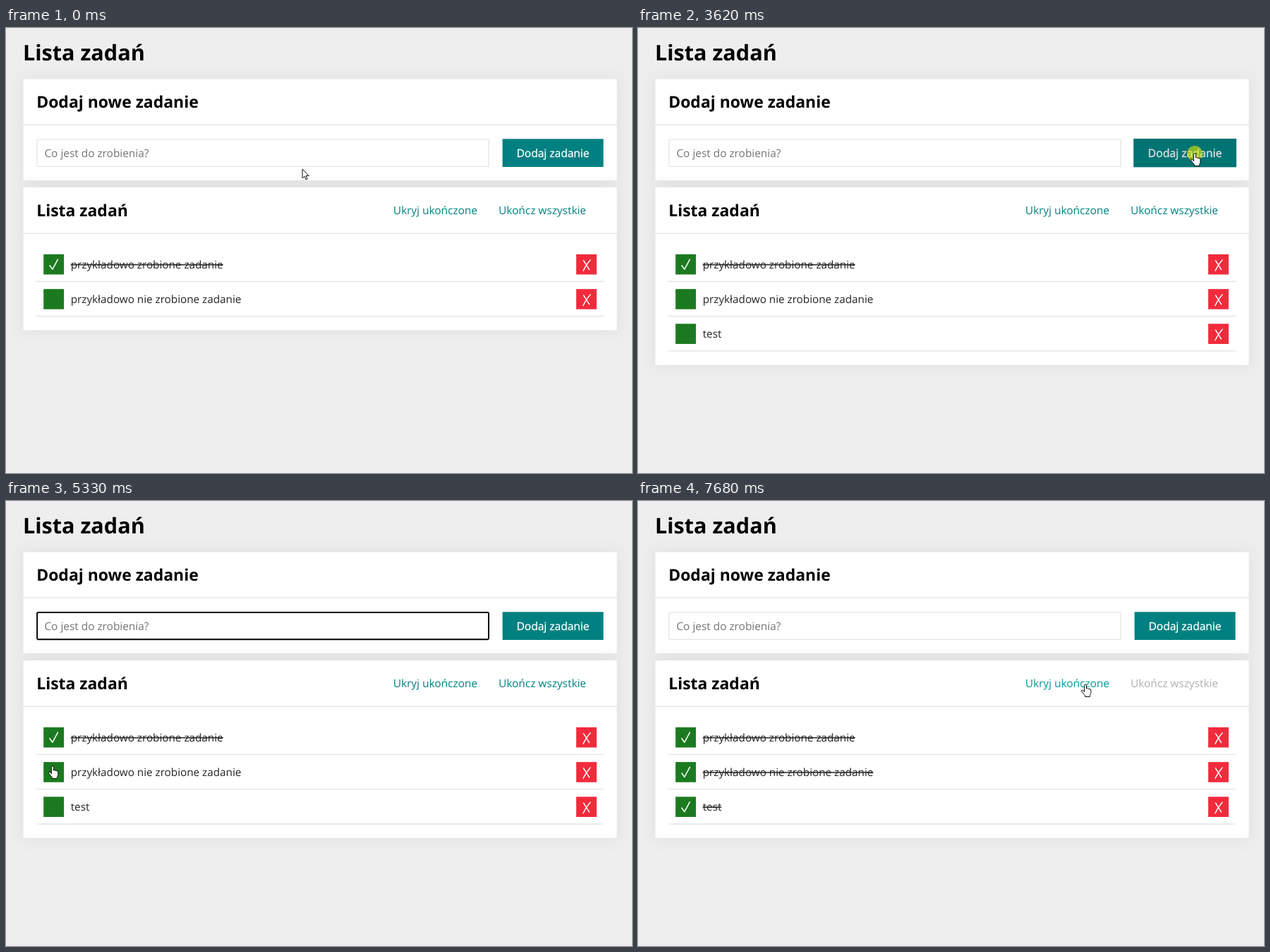
Write an HTML page that moves like this. It is 887x631 px and loops after 8 s.

```html
<!DOCTYPE html>
<html lang="pl">
<head>
<meta charset="utf-8">
<title>Lista zadań</title>
<style>
  html, body { margin: 0; width: 100%; height: 100%; overflow: hidden; background: #eee; }
  svg { display: block; width: 100vw; height: 100vh; }
  text { font: 15.4px "Open Sans", "Noto Sans", sans-serif; text-rendering: geometricPrecision; white-space: pre; }
  .title { font-size: 30.6px; font-weight: 700; }
  .heading { font-size: 22.95px; font-weight: 700; }
  .item { font-size: 15.26px; fill: #242424; }
  .done { text-decoration: line-through; }
  .card { fill: #fff; filter: drop-shadow(0 0 10px #ddd); }
  .rule { stroke: #e6e6e6; stroke-width: 1.4; }
  .mark { fill: none; stroke: #fff; stroke-width: 1.5; stroke-linecap: round; stroke-linejoin: round; }
  .field { fill: #fff; stroke: #e8e8e8; stroke-width: 1.4; }
  .field.focused { stroke: #000; stroke-width: 1.9; rx: 1.5px; }
  #buttonText { font-size: 15.5px; stroke-width: .3; text-anchor: middle; }
</style>
</head>
<body>
<svg viewBox="0 0 887 631">
  <rect width="887" height="631" fill="#eee"/>
  <text class="title" x="23.9" y="46">Lista zadań</text>

  <rect class="card" x="24.5" y="72.5" width="841" height="143.5"/>
  <rect class="card" id="listCard" x="24.5" y="226" width="841"/>
  <path class="rule" d="M24.5 137.3H865.5M24.5 291.2H865.5"/>
  <text class="heading" x="43.2" y="113.3">Dodaj nowe zadanie</text>
  <text class="heading" x="43.2" y="266.8">Lista zadań</text>

  <rect class="field" id="field" x="44.1" y="158" width="639.8" height="38.3"/>
  <text id="fieldText" x="54.4" y="183.2"></text>
  <rect id="caret" y="169" width="1" height="18"/>

  <g id="button">
    <rect id="buttonFace" x="703.5" y="157.3" width="143" height="39.7"/>
    <text id="buttonText" x="775" y="183.2">Dodaj zadanie</text>
  </g>
  <text id="hideLink" x="548.8" y="264.4">Ukryj ukończone</text>
  <text id="finishLink" x="698.1" y="264.4">Ukończ wszystkie</text>

  <g id="rows"></g>
  <circle id="click" r="11" fill="#e6e600" opacity=".6"/>
  <path id="pointer" stroke="#111" stroke-linejoin="round"/>
</svg>
<script>
const LOOP = 8000, FADE = 120, CLICK_TIME = 140, BLINK = 520, ROW_HEIGHT = 49.25;
const $ = id => document.getElementById(id);
const set = (el, attrs) => { for (const k in attrs) el.setAttribute(k, attrs[k]); };
const show = (el, on) => set(el, { visibility: on ? 'visible' : 'hidden' });

const SHAPES = {
  arrow: 'M0 0V13L3 10.3L5 15L7 14L5 9.6H9Z',
  beam: 'M-3-6.5H-.9L0-6L.9-6.5H3M0-6V6M-3 6.5H-.9L0 6L.9 6.5H3',
  hand: 'M-1.6 11V1.3Q-1.6 0 0 0T1.4 1.3V6Q2.8 4.8 3.8 6.4Q5.2 5.4 6 7Q7.8 6.2 7.8 8.2V11.5' +
        'Q7.8 14 6.3 15.5V17.5H-.6V15.8Q-3 13.5-5.6 9.5Q-5.8 7.6-4 8.2L-1.6 10.5'
};

// Moments of the story, in ms
const FOCUS_FIELD = 160, SUBMIT = 2340, PRESS_BUTTON = 3540, LEAVE_BUTTON = 4590;
const CHECK_TASK = 5340, FINISH_ALL = 6380;
const CLICKS = [FOCUS_FIELD, PRESS_BUTTON, CHECK_TASK, FINISH_ALL];
const KEYS = [1030, 1130, 1400, 1560];

// Each move eases the pointer on to a new place
const MOVES = [
  { from: 50, to: 160, x: 396, y: 179 },
  { from: 2915, to: 3150, x: 900, y: 125 },
  { from: 3350, to: 3520, x: 789, y: 178 },
  { from: 4420, to: LEAVE_BUTTON, x: 748, y: 201.5 },
  { from: LEAVE_BUTTON, to: 5180, x: 66, y: 376 },
  { from: 5550, to: 5750, x: 325, y: 438 },
  { from: 5750, to: 6010, x: 729, y: 267 },
  { from: 6080, to: 6250, x: 735, y: 254 },
  { from: 6920, to: 7360, x: 641, y: 266 },
  { from: 7510, to: 7680, x: 634, y: 260 }
];

const TASKS = [
  { text: 'przykładowo zrobione zadanie', added: 0, done: 0 },
  { text: 'przykładowo nie zrobione zadanie', added: 0, done: CHECK_TASK + 90 },
  { text: 'test', added: SUBMIT, done: FINISH_ALL + 90 }
];

$('rows').innerHTML = TASKS.map((task, i) => `
  <g transform="translate(0 ${335.2 + i * ROW_HEIGHT})">
    <path class="rule" d="M43.5 24.3H846.5"/>
    <rect x="53.2" y="-14.3" width="28.9" height="28.6" fill="#1b7a1f"/>
    <path class="mark tick" d="M62 1.5L65.9 7L73.4-7"/>
    <text class="item" x="91.7" y="5.5">${task.text}</text>
    <rect x="808" y="-14.3" width="28.9" height="28.6" fill="#f12b3c"/>
    <path class="mark" d="M818.3-5.5L826.5 7.5M828-6.5Q822 0 817.8 9"/>
  </g>`).join('');
const rows = [...$('rows').children];

function ease(t, from, to = from + FADE) {
  const u = Math.min(1, Math.max(0, (t - from) / (to - from)));
  return u * u * (3 - 2 * u);
}

function pointerAt(t) {
  let x = 420, y = 200;
  for (const move of MOVES) {
    const u = ease(t, move.from, move.to);
    x += (move.x - x) * u;
    y += (move.y - y) * u;
  }
  return { x, y };
}

function isOver(el, { x, y }, margin = 0) {
  const box = el.getBBox();
  return x >= box.x && x <= box.x + box.width && y >= box.y && y <= box.y + box.height + margin;
}

function drawField(t) {
  const focused = t >= FOCUS_FIELD && t < PRESS_BUTTON ||
                  t >= PRESS_BUTTON + CLICK_TIME && t < CHECK_TASK;
  $('field').classList.toggle('focused', focused);

  const typed = t < SUBMIT ? 'test'.slice(0, KEYS.filter(k => k <= t).length) : '';
  const label = $('fieldText');
  label.textContent = typed || 'Co jest do zrobienia?';
  set(label, { fill: typed ? '#222' : '#757575' });

  const lastInput = Math.max(...[...CLICKS, ...KEYS].filter(k => k <= t));
  const blinkOn = Math.floor((t - lastInput) / BLINK) % 2 === 0;
  set($('caret'), { x: Math.round(55 + (typed ? label.getComputedTextLength() : 0)) });
  show($('caret'), focused && blinkOn);
}

function drawButton(t) {
  const hover = ease(t, 3380) - ease(t, LEAVE_BUTTON, LEAVE_BUTTON + 2 * FADE);
  const press = ease(t, PRESS_BUTTON) - ease(t, PRESS_BUTTON + CLICK_TIME);
  const scale = 1 + 0.038 * hover - 0.025 * press;
  const light = 1 + 0.2 * hover - 0.4 * press;
  const gray = level => Math.min(255, Math.round(level * light));
  const ink = `rgb(${gray(255)},${gray(255)},${gray(255)})`;
  set($('button'), { transform: `translate(775 177.2) scale(${scale}) translate(-775 -177.2)` });
  set($('buttonFace'), { fill: `rgb(0,${gray(128)},${gray(128)})` });
  set($('buttonText'), { fill: ink, stroke: ink });
}

function drawList(t) {
  const visibleRows = TASKS.filter(task => t >= task.added).length;
  set($('listCard'), { height: 104 + visibleRows * ROW_HEIGHT });
  rows.forEach((row, i) => {
    const { added, done } = TASKS[i];
    show(row, t >= added);
    show(row.querySelector('.tick'), t >= done);
    row.querySelector('.item').classList.toggle('done', t >= done);
  });
}

function drawPointer(t) {
  const at = pointerAt(t);
  const links = [$('hideLink'), $('finishLink')];
  for (const link of links) set(link, { fill: isOver(link, at, -2) ? '#009a9a' : '#008080' });
  if (t >= FINISH_ALL + 90) set($('finishLink'), { fill: '#b0b0b0' });

  const onCheckbox = t > 5100 && t < 5560;
  const clickable = [$('buttonFace'), ...links].some(el => isOver(el, at, 6));
  const shape = isOver($('field'), at) ? 'beam' : clickable || onCheckbox ? 'hand' : 'arrow';
  set($('pointer'), {
    d: SHAPES[shape],
    fill: shape === 'beam' ? 'none' : '#fff',
    transform: `translate(${at.x} ${at.y})`
  });
  set($('click'), { cx: at.x, cy: at.y });
  show($('click'), CLICKS.some(c => t >= c && t < c + CLICK_TIME));
}

const start = performance.now();
function draw() {
  const t = (performance.now() - start) % LOOP;
  drawField(t);
  drawButton(t);
  drawList(t);
  drawPointer(t);
  requestAnimationFrame(draw);
}
draw();
</script>
</body>
</html>
```
